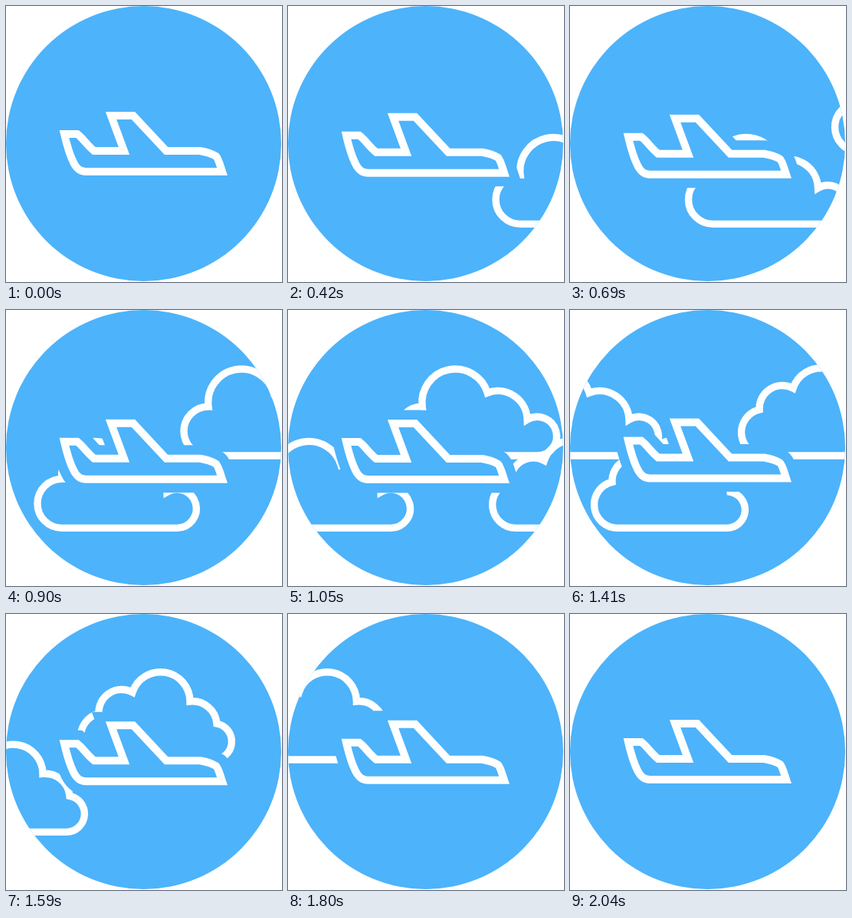
An HTML page for the animation above (2.07 s loop, 360 by 360 pixels).

```html
<!DOCTYPE html>
<html lang="en">
<head>
<meta charset="utf-8">
<title>Plane in the clouds</title>
<style>
  html, body { margin: 0; width: 100%; height: 100%; overflow: hidden; background: #fff; }
  svg { display: block; width: 100vw; height: 100vh; }
  .cloud { fill: none; stroke: #fff; stroke-width: 9.4; }
  .halo { fill: #4db3fb; stroke: #4db3fb; stroke-width: 35; }
  .plane { fill: none; stroke: #fff; stroke-width: 10; }
</style>
</head>
<body>
<svg viewBox="0 0 360 360">
  <defs>
    <clipPath id="disc"><circle cx="179.5" cy="179.5" r="179.5"/></clipPath>
    <!-- Origin of each cloud: left edge, base line -->
    <path id="wide" d="M37 0A32 32 0 0 1 37 -64A43.6 43.6 0 0 1 122 -82A38.5 38.5 0 0 1 174 -47A25.3 25.3 0 1 1 187 0Z"/>
    <path id="tall" d="M35 0A30.4 30.4 0 0 1 28 -60A30 30 0 0 1 72 -88A38.5 38.5 0 0 1 147 -76A32 32 0 0 1 182 -47A23.7 23.7 0 0 1 178 0Z"/>
    <path id="body" d="M76 167H93C101 173 105 181 115 189H154L137 143H166L209 189H253C262 190.500 269 193 274 196C277 199 279 207 282 216H104C95 216 91 210 88 204C82 192 79 180 76 167Z"/>
  </defs>
  <g clip-path="url(#disc)">
    <rect width="360" height="360" fill="#4db3fb"/>
    <g id="sky" class="cloud">
      <use href="#wide" x="0" y="284.400"/>
      <use href="#wide" x="191" y="190"/>
      <use href="#tall" x="315" y="284.400"/>
      <use href="#tall" x="507" y="190"/>
    </g>
    <g id="craft">
      <use href="#body" class="halo"/>
      <use href="#body" class="plane"/>
    </g>
  </g>
</svg>
<script>
  const LOOP = 2070, STEP = 30, HOLD = 90, BOB = 5;
  // time in ms, left edge of the first cloud
  const keys = [[0, 355], [420, 266], [900, 36], [1200, -148], [1410, -288], [1590, -414], [2070, -764]];
  const sky = document.getElementById('sky');
  const craft = document.getElementById('craft');

  const span = i => keys[i + 1][0] - keys[i][0];
  const rate = i => (keys[i + 1][1] - keys[i][1]) / span(i);
  const last = keys.length - 1;
  const slopes = keys.map((_, i) => i && i < last
    ? (rate(i - 1) * span(i) + rate(i) * span(i - 1)) / (span(i - 1) + span(i))
    : 0);
  slopes[0] = 2 * rate(0) - slopes[1];
  slopes[last] = 2 * rate(last - 1) - slopes[last - 1];

  // Smooth cubic through the keys
  function scrollAt(t) {
    let i = 0;
    while (i < last - 1 && t >= keys[i + 1][0]) i++;
    const h = span(i), u = (t - keys[i][0]) / h, v = 1 - u;
    return v * v * (1 + 2 * u) * keys[i][1] + u * u * (3 - 2 * u) * keys[i + 1][1]
      + h * u * v * (v * slopes[i] - u * slopes[i + 1]);
  }

  function draw(now) {
    const raw = now % LOOP;
    const t = raw < HOLD ? 0 : Math.floor(raw / STEP) * STEP;
    const dip = BOB * (1 - Math.cos(2 * Math.PI * t / LOOP)) / 2;
    sky.setAttribute('transform', `translate(${scrollAt(t).toFixed(2)} 0)`);
    craft.setAttribute('transform', `translate(0 ${dip.toFixed(2)})`);
  }

  const start = performance.now();
  function tick() {
    draw(performance.now() - start);
    requestAnimationFrame(tick);
  }
  tick();
</script>
</body>
</html>
```
